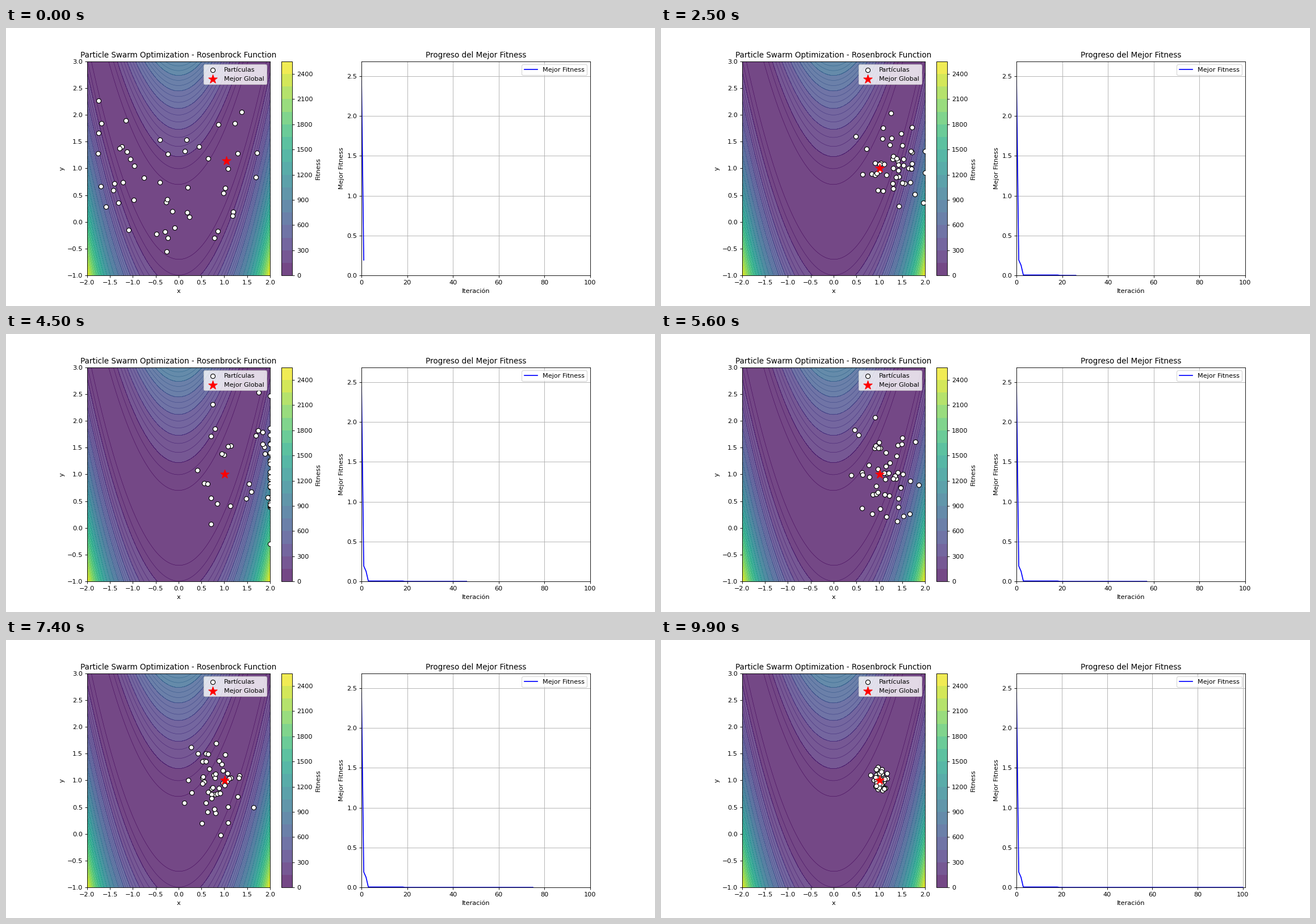
Write a matplotlib script that moves like this. It is 1143x490 px and loops after 10000 ms.

```python
import numpy as np
import matplotlib.pyplot as plt
from matplotlib.animation import FuncAnimation

WIDTH, HEIGHT, DPI = 1143, 490, 81.2
FRAMES, INTERVAL = 100, 100
COUNT = 50
LOW, HIGH = np.array([-2, -1]), np.array([2, 3])
OPTIMUM = np.array([1.0, 1.0])

# The swarm starts scattered along the curved valley, denser on the left.
rng = np.random.default_rng(7)
start_x = -1.76 + 3.5 * rng.random(COUNT) ** 1.25
start_y = rng.uniform(-.65, 1.6, COUNT) + .35 * start_x ** 2
START = np.column_stack([start_x, start_y])
SIDEWAYS = rng.normal(0, (.24, .33), START.shape)

# Swings through the optimum completed by a few iterations.
KEYS = [0, 15, 34, 56, 74, 88, 99]
TURNS = [0, 2.73, 6.5, 10.28, 13.22, 15.75, 17.75]


def rosenbrock(x, y):
    return (1 - x) ** 2 + 100 * (y - x ** 2) ** 2


def swarm(i):
    s = i / (FRAMES - 1)
    angle = 2 * np.pi * np.interp(i, KEYS, TURNS)
    swing = (1 + .6 * s - 1.35 * s ** 2) * np.cos(angle)
    spread = (.35 * s + 1.4 * np.sin(np.pi * s)) * np.sin(angle)
    offset = swing * (START - OPTIMUM) + spread * SIDEWAYS
    return np.clip(OPTIMUM + offset, LOW, HIGH)


def best_position(i):
    return OPTIMUM + np.array([.045, .14]) / (1 + .6 * i)


history = np.full(FRAMES + 1, .0005)
history[:19] = .005
history[:3] = 2.4425, .193, .128

# A hair over the pixel size so that truncation cannot lose a pixel.
fig, (ax_map, ax_fit) = plt.subplots(
    1, 2, figsize=((WIDTH + .001) / DPI, (HEIGHT + .001) / DPI), dpi=DPI)

X, Y = np.meshgrid(np.linspace(-2, 2, 100), np.linspace(-1, 3, 100))
Z = rosenbrock(X, Y)
fill = ax_map.contourf(X, Y, Z, levels=np.arange(0, 2551, 150),
                       cmap="viridis", alpha=.75)
ax_map.contour(X, Y, Z, levels=np.arange(0, 2551, 50),
               cmap="viridis", linewidths=.5)
fig.colorbar(fill, ax=ax_map, label="Fitness", ticks=np.arange(0, 2401, 300))
particles = ax_map.scatter([], [], c="white", edgecolors="black", s=50,
                           label="Partículas", zorder=3)
star = ax_map.scatter([], [], c="red", marker="*", s=200,
                      label="Mejor Global", zorder=4)
ax_map.set(xlim=(-2, 2), ylim=(-1, 3), xlabel="x", ylabel="y",
           title="Particle Swarm Optimization - Rosenbrock Function")
ax_map.legend(loc="upper right")

curve, = ax_fit.plot([], [], "b-", label="Mejor Fitness")
ax_fit.set(xlim=(0, 100), ylim=(0, history[0] * 1.1), xlabel="Iteración",
           ylabel="Mejor Fitness", title="Progreso del Mejor Fitness")
ax_fit.grid(True)
ax_fit.legend(loc="upper right")


def update(i):
    particles.set_offsets(swarm(i))
    star.set_offsets([best_position(i)])
    count = i + 2
    curve.set_data(np.arange(count), history[:count])
    ax_fit.set_xlim(0, max(100, count))
    return particles, star, curve


anim = FuncAnimation(fig, update, frames=FRAMES, interval=INTERVAL,
                     repeat=True, repeat_delay=0)
plt.show()
```
